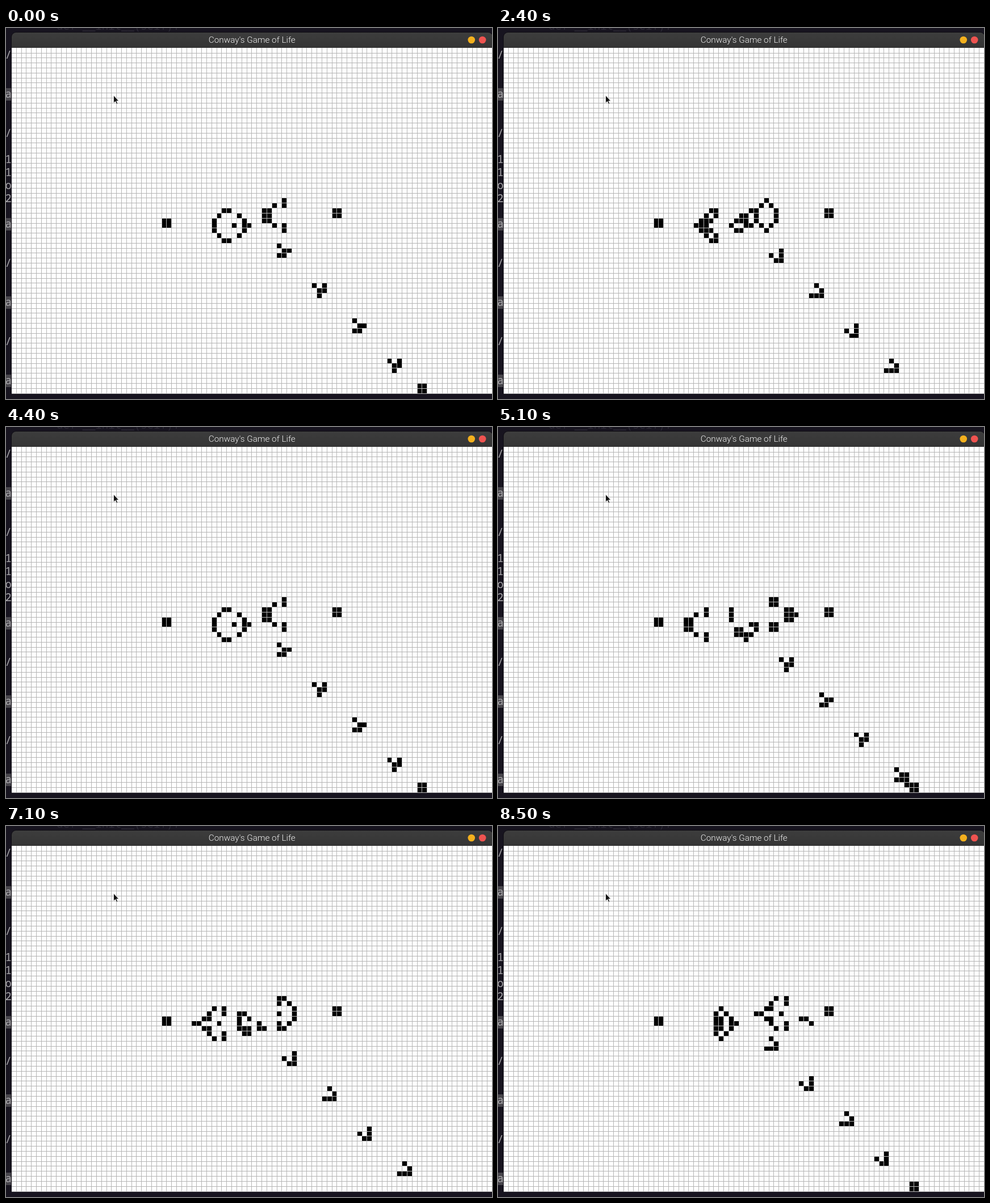
An HTML page with a canvas for the animation above (8.6 s loop, 856 by 654 pixels).

```html
<!DOCTYPE html>
<html lang="en">
<head>
<meta charset="utf-8">
<title>Conway's Game of Life</title>
<style>
  html, body { margin: 0; width: 100%; height: 100%; overflow: hidden; background: #17141f; }
  svg, canvas { position: absolute; left: 0; top: 0; display: block; }
  .mono { font: 19px "Noto Sans Mono", "DejaVu Sans Mono", monospace; fill: #a9a8ab; }
  .title { font: 300 15.3px Roboto, "Open Sans", sans-serif; fill: #f0f0f0; text-anchor: middle; }
</style>
</head>
<body>
<svg id="back" width="856" height="654" viewBox="0 0 856 654">
  <defs>
    <linearGradient id="bar" x1="0" y1="0" x2="0" y2="1">
      <stop offset="0" stop-color="#3d3d3d"/>
      <stop offset="1" stop-color="#343434"/>
    </linearGradient>
  </defs>
  <rect width="856" height="654" fill="#17141f"/>
  <text class="mono" x="89" y="3" style="fill:#2b2834">def __init__(self):</text>
  <g id="shell"></g>
  <path d="M9 645V16a9 9 0 0 1 9-9H849a9 9 0 0 1 9 9V645Z" fill="#0e0c12"/>
  <path d="M10 36V16a8 8 0 0 1 8-8H849a8 8 0 0 1 8 8V36Z" fill="url(#bar)"/>
  <text class="title" x="433.3" y="26.3">Conway's Game of Life</text>
  <circle cx="819.8" cy="21" r="6.3" fill="#f3b01e"/>
  <circle cx="839.2" cy="21" r="6.3" fill="#ee5350"/>
</svg>
<canvas id="board" width="856" height="654"></canvas>
<svg width="856" height="654" viewBox="0 0 856 654">
  <path d="M189.5 118.8V132.2L192.6 129.4L194.8 134.3L196.9 133.4L194.8 128.7H198.8Z"
        fill="#111" stroke="#fff" stroke-width=".8" stroke-linejoin="round"/>
</svg>
<script>
const COLS = 96, ROWS = 69, PITCH = 8.8235, LEFT = 9.8, TOP = 35.6, GAP = 0.9;
const LOOP = 8600, STEP = 100, RATE = 1.373, PHASE = 0.34, WARMUP = 150;

// Glider gun: columns of live cells, row by row.
const GUN = [
  [24], [22, 24], [12, 13, 20, 21, 34, 35], [11, 15, 20, 21, 34, 35],
  [0, 1, 10, 16, 20, 21], [0, 1, 10, 14, 16, 17, 22, 24], [10, 16, 24],
  [11, 15], [12, 13]
];

// Shell output peeking out at the left: [baseline, glyph, highlighted]
const SHELL = [
  [54, "/"], [123, "a", 1], [192, "/"], [238, "1"], [261, "1"], [284, "o"], [307, "2"],
  [352, "a", 1], [421, "/"], [490, "a", 1], [559, "/"], [628, "a", 1]
];
document.getElementById("shell").innerHTML = SHELL.map(([y, ch, lit]) =>
  (lit ? `<rect y="${y - 17}" width="10" height="22" fill="#48464c"/>` : "") +
  `<text class="mono" x="-1.5" y="${y}">${ch}</text>`).join("");

// One generation; everything beyond the edge is dead.
const W = COLS + 2;
function evolve(cells) {
  const next = new Uint8Array(cells.length);
  for (let r = 1; r <= ROWS; r++) {
    for (let c = 1; c <= COLS; c++) {
      const i = r * W + c;
      const n = cells[i - W - 1] + cells[i - W] + cells[i - W + 1] + cells[i - 1] +
                cells[i + 1] + cells[i + W - 1] + cells[i + W] + cells[i + W + 1];
      next[i] = n === 3 || (n === 2 && cells[i]) ? 1 : 0;
    }
  }
  return next;
}

let cells = new Uint8Array(W * (ROWS + 2));
GUN.forEach((row, r) => row.forEach(c => { cells[(r + 31) * W + c + 31] = 1; }));
for (let i = 0; i < WARMUP; i++) cells = evolve(cells);

const history = [cells];
const last = Math.ceil(RATE * LOOP / STEP + PHASE);
while (history.length <= last) history.push(evolve(history[history.length - 1]));

const ctx = document.getElementById("board").getContext("2d");
const start = k => Math.round(k);
const x0 = c => start(LEFT + c * PITCH), x1 = c => start(LEFT + (c + 1) * PITCH - GAP);
const y0 = r => start(TOP + r * PITCH), y1 = r => start(TOP + (r + 1) * PITCH - GAP);

function draw(state) {
  ctx.fillStyle = "#fff";
  ctx.fillRect(10, 35, 846, 609);
  ctx.fillStyle = "#b5b5b5";
  for (let c = 0; c < COLS; c++) ctx.fillRect(x1(c), 35, 1, 609);
  for (let r = 0; r < ROWS; r++) ctx.fillRect(10, y1(r), 846, 1);
  ctx.fillStyle = "#000";
  for (let r = 0; r < ROWS; r++) {
    for (let c = 0; c < COLS; c++) {
      if (state[(r + 1) * W + c + 1]) ctx.fillRect(x0(c), y0(r), x1(c) - x0(c), y1(r) - y0(r));
    }
  }
}

// The display hangs briefly twice while the game keeps running.
function generation(ms) {
  let i = Math.floor((ms % LOOP) / STEP);
  if (i === 25 || i === 26) i = 24;
  if (i === 29) i = 28;
  return Math.floor(RATE * i + PHASE);
}

const begin = performance.now();
let shown = -1;
function tick() {
  const g = generation(performance.now() - begin);
  if (g !== shown) draw(history[shown = g]);
  requestAnimationFrame(tick);
}
tick();
</script>
</body>
</html>
```
